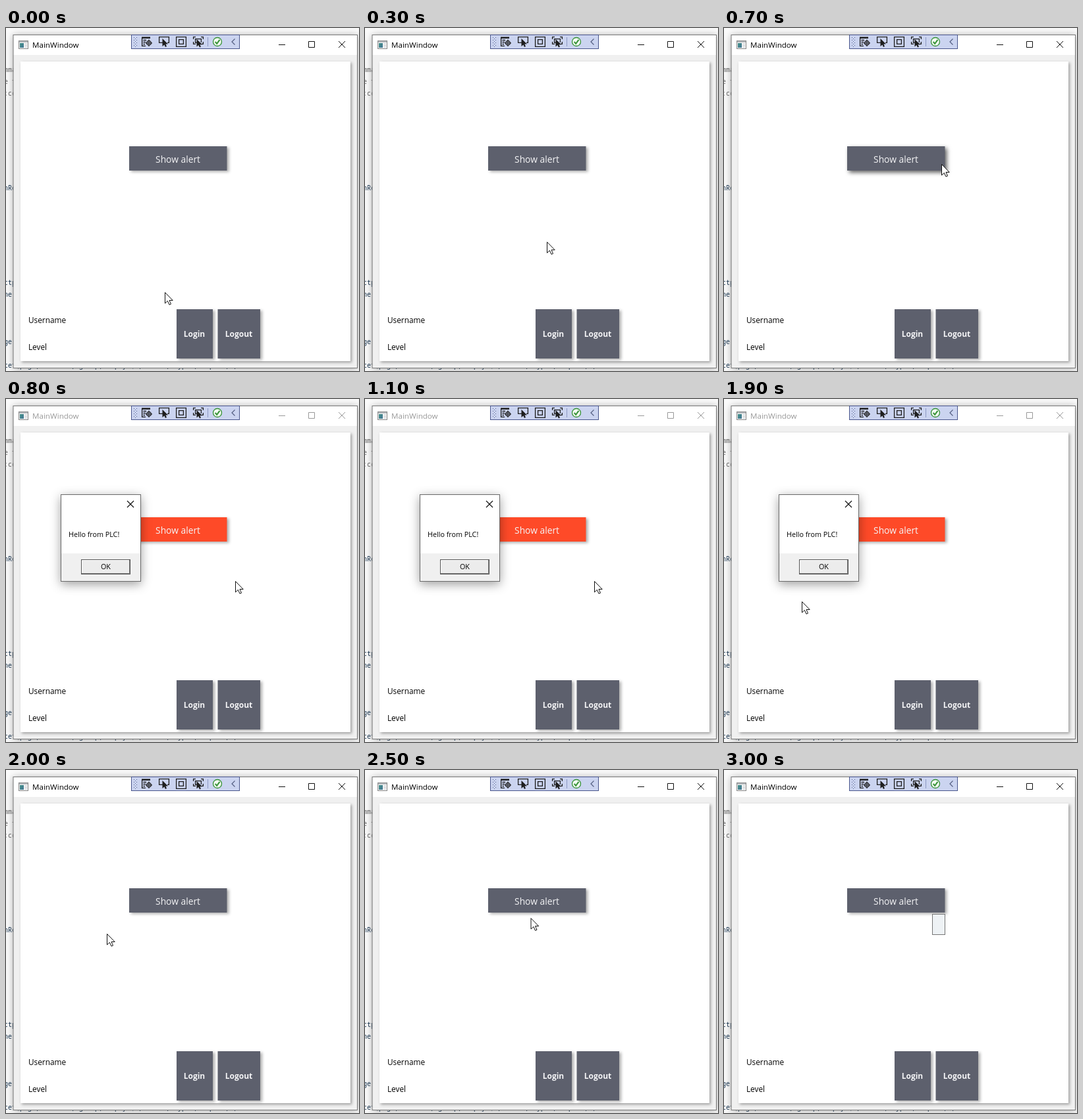
Animation, 536 px wide and 522 px high, one loop 3100 ms. Source, as an HTML page:

```html
<!DOCTYPE html>
<html lang="en">
<head>
<meta charset="utf-8">
<title>Alert window</title>
<style>
  html, body { margin: 0; width: 100%; height: 100%; overflow: hidden; background: #fff; }
  svg { display: block; font-family: "Open Sans", "Noto Sans", sans-serif; }
  .code { font: 10px "Noto Sans Mono", "DejaVu Sans Mono", monospace; fill: #1d3a56; white-space: pre; }
  .comment { fill: #666; }
  .window { filter: drop-shadow(0 1px 6px rgba(0, 0, 0, .32)); }
  .panel { filter: drop-shadow(2px 2px 2px rgba(0, 0, 0, .35)); }
  .button { fill: #5d606d; filter: drop-shadow(3px 2px 2px rgba(0, 0, 0, .32)); }
  .button.hover { filter: drop-shadow(3px 3px 3px rgba(0, 0, 0, .62)); }
  .busy .button.alert { fill: #fe4a28; }
  .label { fill: #f4f4f6; text-anchor: middle; }
  .bold { font-size: 12px; font-weight: 700; }
  .field { font-size: 11.8px; }
  .line { fill: none; stroke: #111; }
  .tool { fill: none; stroke: #1e1e1e; stroke-width: 1.3; }
  .solid { fill: #1e1e1e; stroke: none; }
  .busy .caption { fill: #999; }
  .busy .controls { stroke: #999; }
  .busy .frame { stroke: #aaa; }
  .dialog { filter: drop-shadow(0 4px 8px rgba(0, 0, 0, .38)); }
  .dialog text { font-size: 10.75px; }
</style>
</head>
<body>
<svg id="stage" width="536" height="522" viewBox="0 0 536 522">
  <defs>
    <path id="arrow" d="M0 0V16.5L3.9 12.9L6.5 18.7L9 17.6L6.5 12H11.7Z"/>
    <linearGradient id="screen" x2="1" y2="1">
      <stop stop-color="#3f8f86"/><stop offset="1" stop-color="#4a7896"/>
    </linearGradient>
    <pattern id="dots" width="4" height="4" patternUnits="userSpaceOnUse">
      <path d="M0 0h1v1H0zM2 2h1v1H2z" fill="#5c6894"/>
    </pattern>
  </defs>

  <rect width="536" height="522" fill="#fbfbfb"/>
  <g id="code" class="code"></g>

  <rect class="window" x="11" y="10" width="523" height="508" fill="#f0f0f0"/>
  <path d="M11 10H534V41H11Z" fill="#fff"/>
  <rect class="panel" x="22" y="51" width="501" height="456" fill="#fff"/>
  <rect class="line frame" x="11" y="10.5" width="522.5" height="507" style="stroke:#777"/>

  <rect x="19.5" y="19.5" width="14" height="12" fill="#f5f5f5" stroke="#888"/>
  <path d="M20 20H33V22H20Z" fill="#b4b8bc"/>
  <path d="M21 23H27V30H21Z" fill="url(#screen)"/>
  <path d="M28.5 24H32M28.5 26.5H32M28.5 29H32" stroke="#c4c8cc"/>
  <text class="caption" x="40" y="30" font-size="11.6">MainWindow</text>
  <path class="line controls" d="M414 25.5H424M459.5 20.5H468.5V29.5H459.5ZM505 20L515 30M515 20L505 30"/>

  <g id="toolbar">
    <rect x="190.5" y="10.5" width="164" height="21" fill="#cbd4f0" stroke="#4a568c"/>
    <rect x="194" y="13" width="5" height="16" fill="url(#dots)"/>
    <path class="solid" d="M206 13.5H219V16H206Z"/>
    <path class="tool" d="M206.6 15V27.4H212M208.5 18.5H213M208.5 21.5H212M208.5 24.5H211M217 17.5V28M212 22.8H222"/>
    <circle class="tool" cx="217" cy="22.8" r="3.2"/>
    <path class="tool" d="M238 22.4H232.6V13.6H247.4V22.4H245"/>
    <path class="solid" d="M237.5 16V28L240.4 25.4L242 29L244 28L242.4 24.6H246Z"/>
    <path class="tool" d="M258.6 13.6H273.4V28.4H258.6ZM262.6 17.6H269.4V24.4H262.6Z"/>
    <path class="tool" d="M284.6 17V13.6H288M296 13.6H299.4V17M284.6 21V24.4H288M299.4 21V24.4H297M290 22.4H287.6V16.6H296.4V22"/>
    <path class="solid" d="M289.5 17V28.5L292.3 26L294 29.5L296 28.5L294.4 25.2H298Z"/>
    <path d="M306.5 14V28" stroke="#8d98c4"/>
    <circle cx="321" cy="21" r="6.5" fill="#f2faf2" stroke="#389338" stroke-width="1.3"/>
    <path d="M317.7 21L320.2 23.8L324.5 17.8" fill="none" stroke="#389338" stroke-width="2"/>
    <path d="M347.5 16.5L343 21L347.5 25.5" fill="none" stroke="#555f82" stroke-width="1.2"/>
  </g>

  <rect id="alert" class="button alert" x="187" y="180" width="148.5" height="37"/>
  <text class="label" x="261" y="205" font-size="13.8">Show alert</text>
  <rect class="button" x="259" y="428" width="55" height="75"/>
  <text class="label bold" x="286" y="469.5">Login</text>
  <rect class="button" x="321.5" y="428" width="64.5" height="75"/>
  <text class="label bold" x="353.5" y="469.5">Logout</text>
  <text class="field" x="34" y="449">Username</text>
  <text class="field" x="34" y="490">Level</text>

  <g id="dialog">
    <rect class="dialog" x="83.5" y="145.5" width="121" height="132" fill="#fff" stroke="#6a6a6a"/>
    <path d="M84 235H204V277H84Z" fill="#f0f0f0"/>
    <path class="line" d="M184 155L194 165M194 155L184 165" stroke-width="1.2"/>
    <g font-size="10.75">
      <text x="95" y="210">Hello from PLC!</text>
      <rect x="114.5" y="244.5" width="74" height="22" fill="#ececec" stroke="#555"/>
      <path d="M115.5 265V245.5H187" fill="none" stroke="#fff"/>
      <path d="M115 265.5H187.5V245" fill="none" stroke="#777"/>
      <text x="151.5" y="259" text-anchor="middle">OK</text>
    </g>
  </g>

  <rect id="popup" x="316.5" y="219.5" width="19" height="31" fill="#eef2f5" stroke="#767676"/>
  <use id="cursor" href="#arrow" fill="#fff" stroke="#111"/>
</svg>
<script>
const LOOP = 3100, STEP = 100;
const el = id => document.getElementById(id);

// Editor text that peeks out behind the window: [baseline, text, class]
const lines = [
  [67, "mmary", "comment"], [85, "e the", "comment"], [103, ":ccount", "comment"],
  [247, "nRead", ""], [391, "ctp", ""], [409, "ne", ""], [481, "ge", ""],
  [517, "tet(page, client   ,    group, reply       (    ,     value, type    ,     input          ;  ,", ""]
];
el("code").innerHTML = lines
  .map(([y, text, kind]) => `<text x="-3" y="${y}" class="${kind}">${text}</text>`).join("");

// Pointer waypoints: [ms, x, y]
const path = [
  [0, 241.5, 402.5], [700, 330.5, 207.5], [800, 348.5, 277.5], [1200, 348.5, 277.5],
  [1400, 118.5, 308.5], [1900, 118.5, 308.5], [2000, 153.5, 249.5], [2900, 322.5, 208.5], [3100, 322.5, 208.5]
];

function pointerAt(t) {
  const i = path.findIndex(p => p[0] > t) - 1;
  const [t0, x0, y0] = path[i], [t1, x1, y1] = path[i + 1];
  const u = (t - t0) / (t1 - t0), k = u * u * (3 - 2 * u);
  return [x0 + (x1 - x0) * k, y0 + (y1 - y0) * k];
}

const show = (id, on) => el(id).style.display = on ? "" : "none";

function draw(now) {
  const t = Math.floor(now % LOOP / STEP) * STEP;
  const [x, y] = pointerAt(t);
  const busy = t >= 800 && t < 2000, popup = t >= 3000;
  const hover = !busy && !popup && x > 187 && x < 335 && y > 180 && y < 217;
  el("stage").classList.toggle("busy", busy);
  el("alert").classList.toggle("hover", hover);
  show("dialog", busy);
  show("popup", popup);
  show("cursor", !popup);
  el("cursor").setAttribute("transform", `translate(${x} ${y})`);
}

const start = performance.now();
function tick() {
  draw(performance.now() - start);
  requestAnimationFrame(tick);
}
tick();
</script>
</body>
</html>
```
